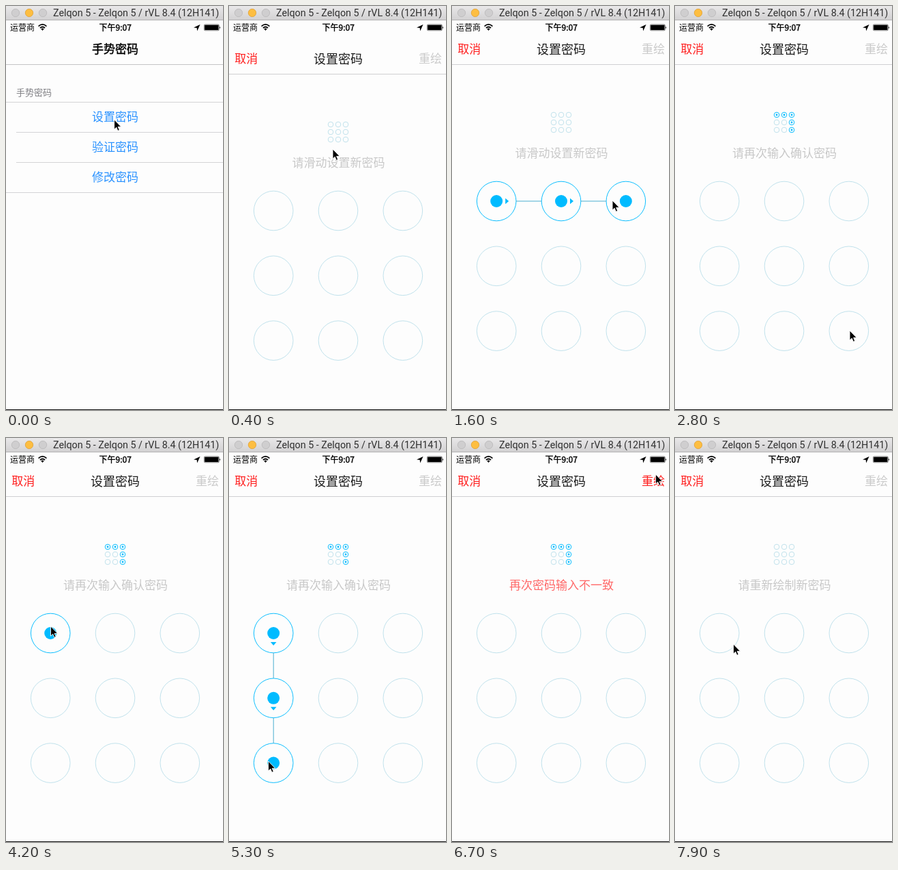
Animation, 318 px wide and 590 px high, one loop 8000 ms. Source, as an HTML page:

```html
<!DOCTYPE html>
<html lang="zh-CN">
<head>
<meta charset="utf-8">
<title>手势密码</title>
<style>
  html, body { margin: 0; width: 100%; height: 100%; overflow: hidden; background: #fdfdfd; }
  svg { display: block; width: 100%; height: 100%; }
  text { font-family: 'Noto Sans CJK SC', 'Noto Sans CJK JP', 'Noto Sans CJK', sans-serif; font-size: 17px; fill: #000; }
  .latin { font-family: Roboto, sans-serif; font-size: 14.3px; fill: #303030; }
  .mid { text-anchor: middle; }
  .light { font-weight: 300; }
  .medium { stroke: #000; stroke-width: .4; }
  .cell { fill: #2a92ff; font-weight: 350; }
  .rule { stroke: #d4d4d6; }
  .node { fill: none; stroke: #add8e6; stroke-width: .75; }
  .on .node { stroke: #0bf; stroke-width: .95; }
  .dot, .arrow { fill: #0bf; visibility: hidden; }
  .on .dot { visibility: visible; }
  #trail { fill: none; stroke: #4aaed0; }
</style>
</head>
<body>
<svg viewBox="0 0 318 590">
  <defs>
    <linearGradient id="chrome" x2="0" y2="1">
      <stop stop-color="#e9e8e9"/><stop offset="1" stop-color="#d2d1d2"/>
    </linearGradient>
  </defs>
  <rect width="318" height="590" fill="#fdfdfd"/>

  <g id="home">
    <text class="mid medium" x="160" y="69.3">手势密码</text>
    <text x="15" y="131" style="font-size:13px;fill:#808085" class="light">手势密码</text>
    <path class="rule" d="M0 85.5H318" style="stroke:#c4c4c6"/>
    <path class="rule" d="M0 140.5H318M15 184.5H318M15 228.5H318M0 272.5H318"/>
    <text class="mid cell" x="160" y="168.3">设置密码</text>
    <text class="mid cell" x="160" y="212.3">验证密码</text>
    <text class="mid cell" x="160" y="256.3">修改密码</text>
  </g>

  <g id="modal">
    <rect y="21" width="318" height="569" fill="#fdfdfd"/>
    <path class="rule" d="M0 85.5H318" style="stroke:#d0d0d2"/>
    <text x="8.3" y="69.3" style="fill:#ff1e1e">取消</text>
    <text class="mid" x="160" y="69.6" style="font-size:18px;fill:#1c1c1c">设置密码</text>
    <text id="redo" x="278" y="69.3">重绘</text>
    <g id="preview"></g>
    <text id="message" class="mid light" x="160.5" y="221.4"></text>
    <g id="pad"></g>
    <path id="trail"/>
  </g>

  <g id="status">
    <text x="6" y="35.6" style="font-size:12px">运营商</text>
    <g fill="none" stroke="#000" stroke-width="1.7">
      <path d="M47.6 29.6Q53.5 24.2 59.4 29.6M49.9 32.2Q53.5 28.8 57.1 32.2"/>
      <path d="M51.3 33.4Q53.5 31.6 55.7 33.4L53.5 36Z" fill="#000" stroke="none"/>
    </g>
    <text class="mid medium" x="160.2" y="35.6" style="font-size:12px">下午9:07</text>
    <path d="M284.5 27L275 31.4L279.6 31.9L280.2 36.4Z"/>
    <rect x="290.3" y="27" width="22" height="8.8" rx="1.5" fill="none" stroke="#000" stroke-width=".5"/>
    <rect x="291.1" y="27.8" width="20.4" height="7.2" rx=".7"/>
    <path d="M313 30Q315 31.5 313 33Z"/>
  </g>

  <rect width="318" height="20.5" fill="url(#chrome)"/>
  <path d="M0 20.5H318" stroke="#b4b3b4"/>
  <g stroke-width=".8">
    <circle cx="14" cy="10" r="5.7" fill="#cfcecf" stroke="#b9b8b9"/>
    <circle cx="34" cy="10" r="5.7" fill="#fdbe41" stroke="#e0a136"/>
    <circle cx="54" cy="10" r="5.7" fill="#cfcecf" stroke="#b9b8b9"/>
  </g>
  <text class="latin" x="69" y="15">Zelqon 5 - Zelqon 5 / rVL 8.4 (12H141)</text>
  <path d="M0 589.5H318" stroke="#111"/>

  <path id="cursor" d="M0 0V14.2L3.2 11.2L5.3 16.3L7.7 15.3L5.6 10.4H10.2Z" stroke="#fff" stroke-width=".9"/>
</svg>
<script>
const LOOP = 8000, STEP = 100, RADIUS = 28.8;
const OPEN = 75, SAVED = 2800, MISMATCH = 6100, REDO = 7000;
const strokes = [[1150, SAVED], [4000, MISMATCH]];
const savedNodes = [0, 1, 2, 5, 8];

// Pointer waypoints: time, x, y
const waypoints = [
  [0, 158.6, 166], [100, 158.6, 166], [400, 152, 209], [700, 88, 268], [950, 24, 290],
  [1150, 42, 287], [1400, 138, 285], [1600, 235, 284], [1800, 253, 300],
  [2350, 256, 445], [2600, 256, 472], [2800, 256, 474], [3000, 248, 478],
  [3300, 140, 480], [3600, 42, 472], [3700, 50, 380], [3800, 65.5, 275],
  [4200, 65.5, 275], [4400, 65, 308], [5300, 57.6, 472], [5400, 64, 475],
  [5950, 250, 480], [6100, 254, 480], [6250, 256, 455], [6600, 296, 72],
  [6700, 298.4, 53], [7500, 298, 59], [7600, 129, 335], [7700, 129, 335],
  [7900, 85.5, 301], [8000, 85.5, 301]
];

const $ = id => document.getElementById(id);

function add(parent, tag, attrs) {
  const el = document.createElementNS('http://www.w3.org/2000/svg', tag);
  for (const key in attrs) el.setAttribute(key, attrs[key]);
  return parent.appendChild(el);
}

function makeGrid(parent, x0, y0, gap, r, dotR) {
  return Array.from({ length: 9 }, (_, i) => {
    const x = x0 + i % 3 * gap, y = y0 + Math.floor(i / 3) * gap;
    const group = add(parent, 'g', { transform: `translate(${x} ${y})` });
    add(group, 'circle', { r, class: 'node' });
    add(group, 'circle', { r: dotR, class: 'dot' });
    return { x, y, group };
  });
}

const preview = makeGrid($('preview'), 149, 159, 11, 3.8, 1.4);
const pad = makeGrid($('pad'), 65.2, 285, 94.8, RADIUS, 9);
for (const node of pad) {
  node.arrow = add(node.group, 'path', { d: 'M13 -4.3L18 0L13 4.3Z', class: 'arrow' });
}

function pointerAt(t) {
  const i = Math.max(1, waypoints.findIndex(p => p[0] >= t));
  const [t0, x0, y0] = waypoints[i - 1], [t1, x1, y1] = waypoints[i];
  const k = (t - t0) / (t1 - t0);
  return { x: x0 + (x1 - x0) * k, y: y0 + (y1 - y0) * k };
}

const distance = (a, b) => Math.hypot(b.x - a.x, b.y - a.y);

function nodesHit(start, t) {
  const hit = [];
  for (let s = start; s <= t; s += 25) {
    const p = pointerAt(s);
    const node = pad.find(n => distance(n, p) < RADIUS);
    if (node && !hit.includes(node)) hit.push(node);
  }
  return hit;
}

// Line from the rim of a to b, stopping short of b by the given inset
function segment(a, b, inset) {
  const d = distance(a, b);
  if (d <= RADIUS + inset) return '';
  const ux = (b.x - a.x) / d, uy = (b.y - a.y) / d;
  return `M${a.x + ux * RADIUS} ${a.y + uy * RADIUS}L${b.x - ux * inset} ${b.y - uy * inset}`;
}

function drawPattern(t, pointer) {
  const stroke = strokes.find(([from, to]) => t >= from && t < to);
  const hit = stroke ? nodesHit(stroke[0], t) : [];
  let trail = '';
  for (const node of pad) {
    const i = hit.indexOf(node), next = i < 0 ? null : hit[i + 1];
    node.group.classList.toggle('on', i >= 0);
    node.arrow.style.visibility = next ? 'visible' : 'hidden';
    if (next) {
      const angle = Math.atan2(next.y - node.y, next.x - node.x) * 180 / Math.PI;
      node.arrow.setAttribute('transform', `rotate(${angle})`);
      trail += segment(node, next, RADIUS);
    }
  }
  if (hit.length) trail += segment(hit[hit.length - 1], pointer, 0);
  $('trail').setAttribute('d', trail);
}

function messageAt(t) {
  if (t < SAVED) return '请滑动设置新密码';
  if (t < MISMATCH) return '请再次输入确认密码';
  if (t < REDO) return '再次密码输入不一致';
  return '请重新绘制新密码';
}

function modalOffset(t) {
  const w = Math.max(0, t - OPEN) * 0.0171;
  return Math.round(569 * (1 + w) * Math.exp(-w));
}

function render(t) {
  const pointer = pointerAt(t);
  const failed = t >= MISMATCH && t < REDO;
  const saved = t >= SAVED && t < REDO;
  $('modal').setAttribute('transform', `translate(0 ${modalOffset(t)})`);
  $('cursor').setAttribute('transform', `translate(${pointer.x} ${pointer.y})`);
  $('message').textContent = messageAt(t);
  $('message').style.fill = failed ? '#ff6868' : '#c8c8c8';
  $('redo').style.fill = failed ? '#ff1e1e' : '#cacaca';
  preview.forEach((n, i) => n.group.classList.toggle('on', saved && savedNodes.includes(i)));
  drawPattern(t, pointer);
}

const start = performance.now();
function tick() {
  const t = (performance.now() - start) % LOOP;
  render(Math.floor(t / STEP) * STEP);
  requestAnimationFrame(tick);
}
tick();
</script>
</body>
</html>
```
